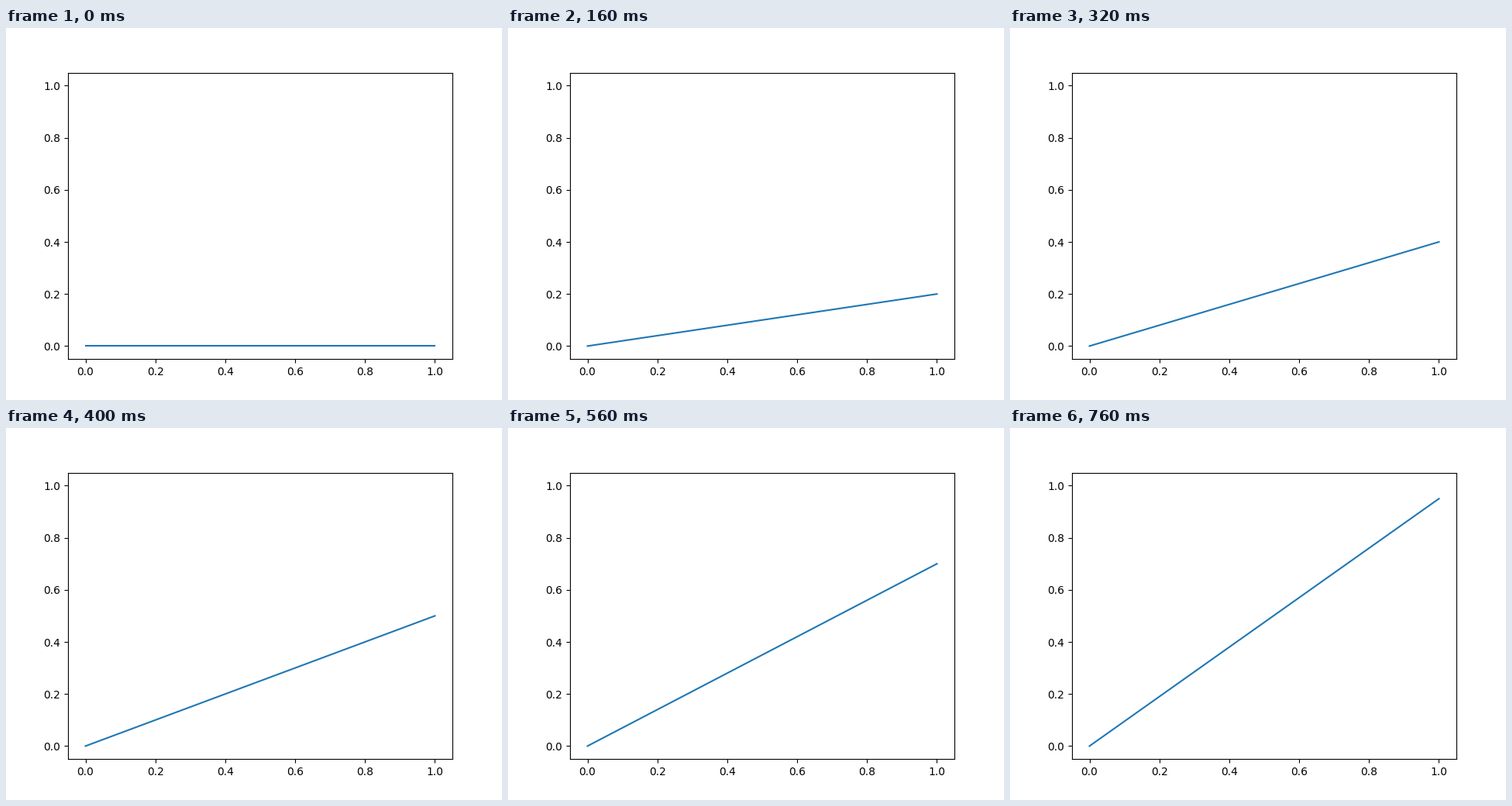
These frames come from a looping animation (640 by 480 pixels, 800 ms). A matplotlib script:

```python
import matplotlib.pyplot as plt
from matplotlib.animation import FuncAnimation

FRAMES = 20
INTERVAL = 40  # ms

fig, ax = plt.subplots(figsize=(6.4, 4.8), dpi=100)
ax.set_xlim(-0.05, 1.05)
ax.set_ylim(-0.05, 1.05)
line, = ax.plot([0, 1], [0, 0], color="#1f77b4", linewidth=1.5)


def update(frame):
    """Tilt the line: its slope grows evenly from 0 towards 1."""
    line.set_ydata([0, frame / FRAMES])
    return line,


anim = FuncAnimation(fig, update, frames=FRAMES, interval=INTERVAL,
                     init_func=lambda: update(0), repeat=True, repeat_delay=0)
plt.show()
```
